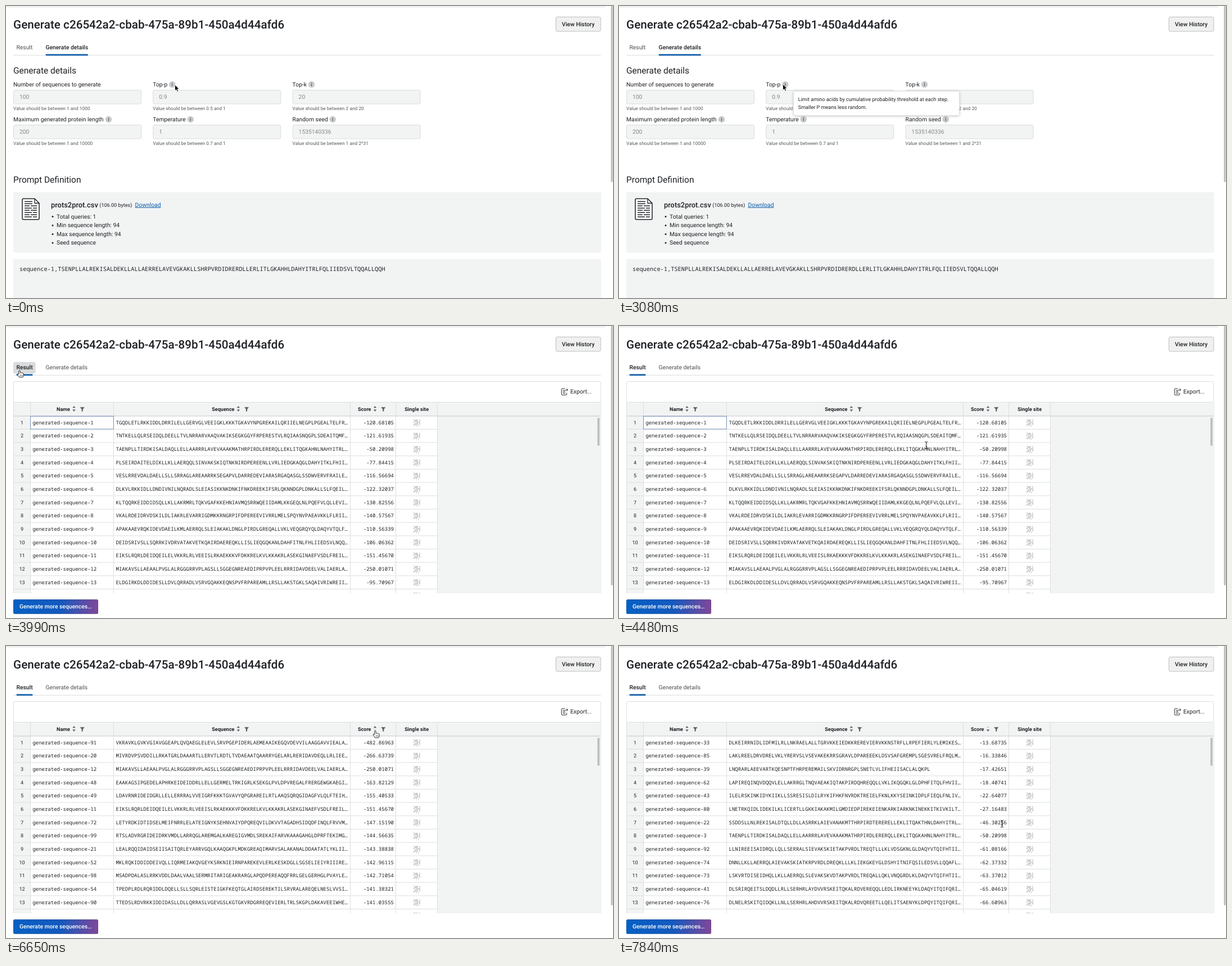
Write an HTML page that moves like this. It is 1080x519 px and loops after 8000 ms.

```html
<!DOCTYPE html>
<html lang="en">
<head>
<meta charset="utf-8">
<title>Generate details</title>
<style>
html, body { margin: 0; width: 100%; height: 100%; overflow: hidden; background: #fff; }
svg { display: block; width: 100%; height: 100%; }
text { font-family: Roboto, Arial, sans-serif; font-size: 10.33px; fill: #1d2024; text-rendering: geometricPrecision; }
.mono { font-family: "Roboto Mono", "Noto Sans Mono", "DejaVu Sans Mono", monospace; }
.title { font-size: 20.66px; font-weight: 500; }
.head { font-size: 15.5px; }
.med { font-weight: 500; }
.file { font-size: 12.9px; font-weight: 500; }
.cell { font-size: 9.05px; }
.th { font-size: 9.05px; font-weight: 700; }
.help { font-size: 8.39px; fill: #55585b; }
.value { fill: #85888a; }
.tab { fill: #4c4f52; }
.link { fill: #0b5cad; text-decoration: underline; }
.white { fill: #fff; }
.mid { text-anchor: middle; }
.end { text-anchor: end; }
</style>
</head>
<body>
<svg id="stage" viewBox="0 0 1080 519">
  <defs>
    <linearGradient id="action">
      <stop offset="0" stop-color="#0560c4"/>
      <stop offset=".55" stop-color="#1459bd"/>
      <stop offset="1" stop-color="#80479a"/>
    </linearGradient>
    <filter id="shadow" x="-10%" y="-30%" width="120%" height="170%">
      <feDropShadow dx="0" dy="1" stdDeviation="2" flood-opacity=".22"/>
    </filter>
    <clipPath id="grid"><rect x="13" y="98" width="1046" height="377"/></clipPath>
  </defs>
</svg>
<script>
const LOOP = 8000, STEP = 70;
const DARK = "#1d2024", PALE = "#f2f4f4", LINE = "#dcdedf", BLUE = "#0f5ca8", BAR = "#bdbebf";
const stage = document.getElementById("stage");

function el(parent, tag, attrs = {}, content) {
  const node = document.createElementNS("http://www.w3.org/2000/svg", tag);
  for (const key in attrs) node.setAttribute(key, attrs[key]);
  if (content !== undefined) node.textContent = content;
  parent.append(node);
  return node;
}
const group = (parent, attrs) => el(parent, "g", attrs);
const text = (parent, x, y, content, cls = "") => el(parent, "text", { x, y, class: cls }, content);
const rect = (parent, x, y, width, height, fill, more) =>
  el(parent, "rect", { x, y, width, height, fill, ...more });
const path = (parent, d, more) => el(parent, "path", { d, fill: "none", stroke: DARK, ...more });
const show = (node, on) => node.setAttribute("visibility", on ? "visible" : "hidden");

// Page frame
rect(stage, 0, 0, 1066, 3, "#f1f1f1", { rx: 1.5 });
text(stage, 13.1, 39.6, "Generate c26542a2-cbab-475a-89b1-450a4d44afd6", "title");
rect(stage, 978.5, 19.5, 79.5, 25.5, "#f0f0f0", { rx: 2.5, stroke: "#bcbec0" });
text(stage, 1018.2, 36, "View History", "med mid");
const thumb = rect(stage, 1076.3, 0, 3.2, 313, BAR, { rx: 1.6 });
path(stage, "M13 87.5H1058.5", { stroke: LINE });
const hover = rect(stage, 13, 64, 39.5, 20.5, "#d9dbdc", { rx: 3 });

// Details view
const details = group(stage);
const TAB_Y = 77.2;
const detailsResult = text(details, 18.5, TAB_Y, "Result", "tab");
text(details, 70.5, TAB_Y, "Generate details", "med");
rect(details, 70.5, 85.5, 75.5, 2.7, BLUE, { rx: 1.2 });
text(details, 13, 120.3, "Generate details", "head");

function info(x, y) {
  el(details, "circle", { cx: x, cy: y, r: 5.8, fill: "#c9cbcd" });
  rect(details, x - .55, y - 1, 1.1, 3.8, "#44474a");
  rect(details, x - .55, y - 3, 1.1, 1.2, "#44474a");
}
function field(x, y, label, value, range, iconX) {
  text(details, x, y + 3.8, label);
  if (iconX) info(iconX, y + .5);
  rect(details, x + .5, y + 10.5, 227, 24.5, PALE, { rx: 2.5, stroke: "#d9dbdc" });
  text(details, x + 11, y + 26.1, value, "value");
  text(details, x, y + 45.8, "Value should be between " + range, "help");
}
field(13, 139, "Number of sequences to generate", "100", "1 and 1000");
field(261.3, 139, "Top-p", "0.9", "0.5 and 1", 295.7);
field(509.6, 139, "Top-k", "20", "2 and 20", 543.6);
field(13, 201, "Maximum generated protein length", "200", "1 and 10000", 182.5);
field(261.3, 201, "Temperature", "1", "0.7 and 1", 328.3);
field(509.6, 201, "Random seed", "1535140336", "1 and 2^31", 581.3);

text(details, 13, 313.6, "Prompt Definition", "head");
rect(details, 13, 331, 1046, 107.5, PALE, { rx: 2 });
rect(details, 13, 449.5, 1046, 80, PALE, { rx: 2 });
path(details, "M31 342.5H51L59 350.5V377.5Q59 379.5 57 379.5H31Q29 379.5 29 377.5V344.5Q29 342.5 31 342.5Z",
  { "stroke-width": 1.5, fill: "#fff" });
path(details, "M51 342.5V350.5H59", { "stroke-width": 1.3 });
for (let i = 0; i < 8; i++) {
  const y = 347.5 + i * 3.9;
  path(details, `M33 ${y}H${i < 2 ? 47 : 42 + i % 2 * 4}` + (i < 2 ? "" : `M${44 + i % 2 * 4} ${y}H55`),
    { "stroke-width": 1.5 });
}
text(details, 80, 357.5, "prots2prot.csv", "file");
text(details, 166.3, 356.5, "(106.00 bytes)", "cell");
text(details, 229.5, 356.8, "Download", "link");
["Total queries: 1", "Min sequence length: 94", "Max sequence length: 94", "Seed sequence"].forEach((line, i) => {
  const y = 377.5 + i * 15.6;
  el(details, "circle", { cx: 83, cy: y - 3.2, r: 1.5, fill: DARK });
  text(details, 90, y, line);
});
text(details, 24, 471, "sequence-1,TSENPLLALREKISALDEKLLALLAERRELAVEVGKAKLLSHRPVRDIDRERDLLERLITLGKAHHLDAHYITRLFQLIIEDSVLTQQALLQQH", "mono");

// Result view: number, sequence, score per row, one block per sort order
const tables = [`
1 TGQDLETLRKKIDDLDRRILELLGERVGLVEEIGKLKKKTGKAVYNPGREKAILQRIIELNEGPLPGEALTELFR -120.68105
2 TNTKELLQLRSEIDQLDEELLTVLNRRARVAAQVAKIKSEGKGGYFRPERESTVLRQIAASNQGPLSDEAITQMF -121.61935
3 TAENPLLTIRDKISALDAQLLELLAARRRLAVEVAAAKMATHRPIRDLERERQLLEKLITQGKAHNLNAHYITRL -50.20998
4 PLSEIRDAITELDIKLLKLLAERQQLSINVAKSKIQTNKNIRDPEREENLLVRLIEDGKAQGLDAHYITKLFHII -77.84415
5 VESLRREVDALDAELLSLLSRRAGLAREAARRKSEGAPVLDARREDEVIARASRGAQASGLSSDWVERVFRAILE -116.56694
6 DLKVLRKKIDLLDNDIVNILNQRADLSLEIASIKKNKDNKIFNKDREEKIFSRLQKNNDGPLDNKALLSLFQEIL -122.32037
7 KLTQQRKEIDDIDSQLLKLLAKRMRLTQKVGAFKKEHNIAVMQSRRWQEIIDAMLKKGEQLNLPQEFVLQLLEVI -130.82556
8 VKALRDEIDRVDSKILDLIAKRLEVARRIGDMKKRNGRPIFDPEREEVIVRRLMELSPQYNVPAEAVKKLFLRII -140.57567
9 APAKAAEVRQKIDEVDAEILKMLAERRQLSLEIAKAKLDNGLPIRDLGREQALLVKLVEQGRQYQLDAQYVTQLF -110.56339
10 DEIDSRIVSLLSQRRKIVDRVATAKVETKQAIRDAEREQKLLISLIEQGQKANLDAHFITNLFHLIIEDSVLNQQ -106.06362
11 EIKSLRQRLDEIDQEILELVKKRLRLVEEISLRKAEKKKVFDKKRELKVLKKAKRLASEKGINAEFVSDLFREIL -151.45670
12 MIAKAVSLLAEAALPVGLALRGGGRRVPLAGSLLSGGEGNREAEDIPRPVPLEELRRRIDAVDEELVALIAERLA -250.01071
13 ELDGIRKDLDDIDESLLDVLQRRADLVSRVGQAKKEQNSPVFRPAREAMLLRSLLAKSTGKLSAQAIVRIWREII -95.70967`, `
91 VKRAVKLGVKVGIAVGGEAPLQVQAEGLELEVLSRVPGEPIDERLAEMEAAIKEGQVDEVVILAAGGAVVIEALA -482.86963
20 MIVRDVPSVDDILLRKATGRLDAAARTLLERVTLRDTLTVDAEAATQAARRYGELARLRERIDAVDEQLLRLIEE -266.63739
12 MIAKAVSLLAEAALPVGLALRGGGRRVPLAGSLLSGGEGNREAEDIPRPVPLEELRRRIDAVDEELVALIAERLA -250.01071
48 EAAKAGSIPGEDELAPHRKEIDEIDDRLLELLGERMELTRKIGRLKSEKGLPVLDPVREGALFRERGEWGKAEGI -163.82129
49 LDAVRNRIDEIDGRLLELLERRRALVVEIGRFKKKTGVAVYQPGRAREILRTLAAQSQRQGIDAGFVLQLFTEIH -155.40533
11 EIKSLRQRLDEIDQEILELVKKRLRLVEEISLRKAEKKKVFDKKRELKVLKKAKRLASEKGINAEFVSDLFREIL -151.45670
72 LETYRDKIDTIDSELMEIFNRRLELATEIGNYKSEHNVAIYDPQREQVILDKVVTAGADHSIDQDFINQLFRVVM -147.15190
99 RTSLADVRGRIDEIDRKVMDLLARRQGLAREMGALKAREGIGVMDLSREKAIFARVKAAAGAHGLDPRFTEKIMG -144.56635
21 LEALRQQIDAIDSEIISAITQRLEYARRVGQLKAAQGKPLMDKGREAQIMARVSALAKANALDDAATATLYKLII -143.38838
52 MKLRQKIDDIDDEIVQLLIQRMEIAKQVGEYKSRKNIEIRNPAREKEVLERLKESKDGLLSGSELIEIYRIIIRE -142.96115
98 MSADPDALASLRRKVDDLDAALVAALSERMRITARIGEAKRARGLAPQDPEREAQQFRRLGELGERHGLPVAYLE -142.71054
54 TPEDPLRDLRQRIDDLDQELLSLLSQRLEISTEIGKFKEQTGLAIRDSEREKTILSRVRALAREQELNESLVVSI -141.38321
90 TTEDSLRDVRKKIDDIDASLLDLLQRRASLVGEVGSLKGTGKVRDGRREQEVIERLTRLSKGPLDAKAVEEIWHE -141.03555`, `
33 DLKEIRRNIDLIDFMILRLLNKRAELALLTGRVKKEIEDKKREREVIERVKKNSTRFLLRPEFIERLYLEMIKES -13.68735
85 LAKLREELDRVDRELVKLYRERVSLVSEVAKEKRRSGRAVLDPAREEEKLDSVSAFGREMPLSGESVRELFRQLM -16.33846
39 LNQRARLAEEVARTKQESNPTFHRPEREMAILSKVIDRNRGPLSNETLVLIFHEIISACLALQKPL -17.42651
62 LAPIREQINQVDQQVLELLAKRRGLTNQVAEAKIQTAKPIRDQHREQQLLVKLIKQGQKLGLDPHFITQLFHVII -18.40741
43 ILELRSKINKIDYKIIKLLSSRESISLDILRYKIFHKFNVRDKTREIELFKNLKKYSEINKIDPLFIEQLFNLIV -22.64077
80 LNETRKQIDLIDEKILKLICERTLLGKKIAKAKMILGMDIEDPIREKEIENKARKIARKNKINEKKITKIVKILT -27.16483
22 SSDDSLLNLREKISALDTQLLDLLASRRKLAIEVANAKMTTHRPIRDTERERELLEKLITQAKTHNLDAHYITRL -46.30256
3 TAENPLLTIRDKISALDAQLLELLAARRRLAVEVAAAKMATHRPIRDLERERQLLEKLITQGKAHNLNAHYITRL -50.20998
92 LLNIREEISAIDRQLLQLLSERRALSIEVAKSKIETAKPVRDLTREQTLLLKLVDSGKNLGLDAQYVTQIFHTII -61.08166
74 DNNLLKLLAERRQLAIEVAKSKIATKRPVRDLDREQKLLLKLIEKGKEYGLDSHYITNIFQSILEDSVLLQQAFL -62.37332
73 LSKVRTDISEIDHQLLKLLAERRQLSLEVAKSKVDTAKPVRDLTREQALLQKLVNQGRDLKLDAQYVTQIFHTII -63.37012
41 DLSRIRQEITSLDQDLLRLLSERHRLAYDVVRSKEITQKALRDVEREQQLLEDLIRKNEEYKLDAQYITQIFQRI -65.04619
76 DLNELRSKITQIDQKLLNLLSERHRLAHDVVRSKEITQKALRDVQREETLLQELITSAENYKLDPQYITQIFQRI -66.60963`];

const result = group(stage);
text(result, 18.5, TAB_Y, "Result", "med");
text(result, 70.5, TAB_Y, "Generate details", "tab");
rect(result, 18.5, 85.5, 29, 2.7, BLUE, { rx: 1.2 });
const box = group(result, { "clip-path": "url(#grid)" });
rect(box, 13.5, 98.5, 1044.5, 400, "#fff", { stroke: LINE, rx: 2 });
path(box, "M994.5 111.3H990Q988.3 111.3 988.3 113V121Q988.3 122.7 990 122.7H996Q997.7 122.7 997.7 121V118.8" +
  "M990.5 114.6H993.5M990.5 117.2H995.5M990.5 119.8H995.5M993.5 116Q994 113.4 999.5 113.4M997.3 111.2L999.8 113.4L997.3 115.6",
  { stroke: "#303336" });
text(box, 1004, 120.3, "Export...");
rect(box, 14, 135.5, 1043.5, 345, PALE);
rect(box, 43.5, 160, 724, 320, "#fff");

const ROW = 23.67, TOP = 159.8;
const edges = [43.5, 191.5, 612.5, 693.5, 767.5];
path(box, "M14 135.5H1058" + edges.map(x => `M${x} 135.5V475`).join(""), { stroke: LINE });
for (let i = 1; i < 14; i++) path(box, `M14 ${TOP + i * ROW}H767.5`, { stroke: LINE });
path(box, "M14 160H1058", { stroke: "#c3c8cd", "stroke-width": 1.2 });

const up = (x, fill) => el(box, "path", { d: `M${x - 2.8} 145.6L${x} 142.2L${x + 2.8} 145.6Z`, fill });
const down = (x, fill) => el(box, "path", { d: `M${x - 2.8} 148.6L${x} 152L${x + 2.8} 148.6Z`, fill });
const GREY = "#5c6064", FAINT = "#cdd0d2";
function header(x, label, sortX) {
  text(box, x, 150.6, label, "th");
  if (!sortX) return;
  const f = sortX + 14.7;
  el(box, "path", { d: `M${f - 4} 144.3H${f + 4}L${f + 1.1} 148V151.2L${f - 1.1} 152.3V148Z`, fill: GREY });
  return [up(sortX, GREY), down(sortX, GREY)];
}
header(90, "Name", 121);
header(366.3, "Sequence", 413.4);
const carets = header(626, "Score", 656.6);
header(709.3, "Single site");

// Small speckled icon shared by all rows
let seed = 90210;
const random = () => (seed = seed * 16807 % 2147483647) / 2147483647;
let speckle = "";
for (let i = 0; i < 36; i++) {
  const x = i % 6 * 2 - 5.3 + random() * .7, y = Math.floor(i / 6) * 2 - 5.3 + random() * .7;
  if (random() < .72) speckle += `M${x.toFixed(2)} ${y.toFixed(2)}h1v1h-1z`;
}
for (let i = 0; i < 14; i++) {
  const mid = 171.5 + i * ROW;
  text(box, 28.5, mid + 3.1, i + 1, "cell mid");
  el(box, "path", { d: speckle, fill: "#5a5d61", transform: `translate(730.5 ${mid})` });
}
const bodies = tables.map(table => {
  const body = group(box);
  table.trim().split("\n").forEach((line, i) => {
    const [id, seq, score] = line.split(" "), y = 174.5 + i * ROW;
    text(body, 47.2, y, "generated-sequence-" + id, "cell mono");
    text(body, 195.5, y, seq + (seq.length > 70 ? "…" : ""), "cell mono");
    text(body, 690, y, score, "cell mono end");
  });
  return body;
});
const picked = rect(box, 43.6, 160.4, 147.8, 22.8, "none", { stroke: "#7590b8" });
rect(box, 1052.3, 163, 3.8, 50, BAR, { rx: 1.9 });
rect(result, 13, 486, 151, 25.7, "url(#action)", { rx: 2.5 });
rect(result, 13.4, 486.4, 150.2, 24.9, "none", { rx: 2.2, stroke: "#111418", "stroke-opacity": .2, "stroke-width": .8 });
text(result, 24, 502, "Generate more sequences…", "med white");

// Tooltip, click ring and pointers
const tip = group(stage);
rect(tip, 310.5, 151.5, 295, 43, "#fff", { rx: 2.5, stroke: "#dfe1e2", filter: "url(#shadow)" });
text(tip, 318.8, 169.2, "Limit amino acids by cumulative probability threshold at each step.", "cell");
text(tip, 318.8, 182.9, "Smaller P means less random.", "cell");

const ring = el(stage, "circle", { fill: "none", stroke: "#333", "stroke-opacity": .55, "stroke-width": 1.5 });
const pointer = group(stage);
const pointers = { arrow: group(pointer), hand: group(pointer), beam: group(pointer) };
path(pointers.arrow, "M0 0V10.6L2.5 8.4L4.2 12.2L6 11.4L4.4 7.7H7.7Z",
  { fill: "#000", stroke: "#fff", "stroke-width": .8 });
path(pointers.hand, "M-1.2 .6Q0 -1 1.2 .6V4.2Q2.4 3.2 3.3 4.5Q4.6 3.6 5.4 5Q7.2 4.4 7.2 6.2V8.6Q7 10.2 6 12H-.6Q-1.4 10 -3.6 7.4Q-4.2 5.6 -2.6 5.8L-1.2 7Z",
  { fill: "#fff", stroke: "#111", "stroke-width": .9 });
path(pointers.hand, "M1.4 7.5V10.2M3.2 7.5V10.2M5 7.5V10.2", { stroke: "#111", "stroke-width": .6 });
path(pointers.beam, "M-2.6 -6.3Q0 -6.3 0 -4.8Q0 -6.3 2.6 -6.3M0 -5V5M-2.6 6.3Q0 6.3 0 4.8Q0 6.3 2.6 6.3M-1.4 2.2H1.4",
  { stroke: "#222", "stroke-width": 1 });

// time, x, y, eased
const route = [
  [0, 300.5, 140], [420, 300.5, 140], [630, 298.5, 139.5], [3010, 298.5, 139.5],
  [3080, 291.5, 139], [3150, 275, 200], [3220, 240, 300], [3290, 185, 345],
  [3360, 115, 275], [3430, 58, 160], [3500, 31, 95], [3570, 24, 79],
  [3990, 24, 79], [4480, 546.8, 212, 1], [4690, 546.8, 212],
  [5250, 668, 155, 1], [5530, 657, 151, 1], [7630, 657, 151], [7840, 681.5, 316, 1], [LOOP, 681.5, 316]
];
const clicks = [[140, 17], [3710, 23.3], [6510, 23.3], [7000, 23.3]];
const HOLD = 140, OPEN = 3990, SORT_UP = 6650, SORT_DOWN = 7140;

function position(t) {
  const i = route.findIndex(k => k[0] > t);
  const [t0, x0, y0] = route[i - 1], [t1, x1, y1, eased] = route[i];
  let p = (t - t0) / (t1 - t0);
  if (eased) p = p * p * (3 - 2 * p);
  return [x0 + (x1 - x0) * p, y0 + (y1 - y0) * p];
}
const clamp = v => Math.max(0, Math.min(1, v));

function draw(time) {
  const t = Math.floor(time % LOOP / STEP) * STEP;
  const opened = t >= OPEN;
  const order = t >= SORT_DOWN ? 2 : t >= SORT_UP ? 1 : 0;
  const [x, y] = position(t);
  const onTab = x > 13 && x < 53 && y > 64 && y < 85;

  details.style.display = opened ? "none" : "";
  result.style.display = opened ? "" : "none";
  thumb.setAttribute("height", opened ? 461 : 313);
  show(hover, onTab);
  detailsResult.style.fill = onTab ? DARK : "";
  bodies.forEach((body, i) => body.style.display = i === order ? "" : "none");
  picked.style.display = t < 6510 ? "" : "none";
  carets[0].setAttribute("fill", order === 2 ? FAINT : GREY);
  carets[1].setAttribute("fill", order === 1 ? FAINT : GREY);
  tip.setAttribute("opacity", Math.min(clamp((t - 420) / 350), clamp(1 - (t - 3080) / 280)));

  const click = clicks.find(c => t >= c[0] && t < c[0] + HOLD);
  show(ring, click);
  if (click) {
    ring.setAttribute("r", click[1]);
    ring.setAttribute("cx", x);
    ring.setAttribute("cy", y);
  }
  let kind = "arrow";
  if (onTab || opened && y > 136 && y <= 160) kind = "hand";
  else if (opened && y > 160) kind = "beam";
  for (const name in pointers) show(pointers[name], name === kind);
  pointer.setAttribute("transform", `translate(${x} ${y})`);
}

const start = performance.now();
function tick() {
  draw(performance.now() - start);
  requestAnimationFrame(tick);
}
tick();
</script>
</body>
</html>
```
